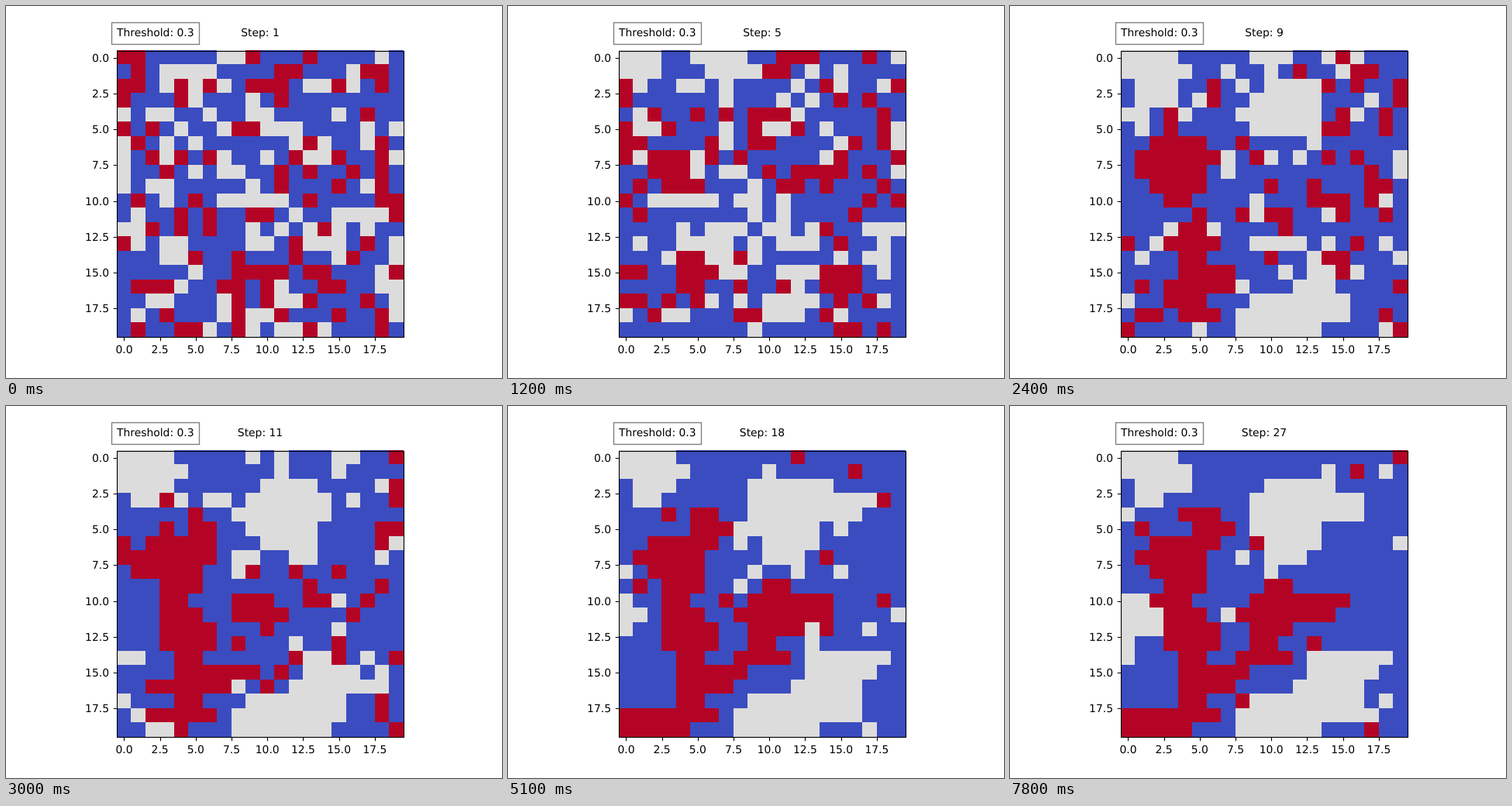
Write an HTML page that moves like this. It is 640 px wide and 480 px high and loops after 8000 ms.

```html
<!DOCTYPE html>
<html lang="en">
<head>
<meta charset="utf-8">
<title>Segregation model</title>
<style>
  html, body { margin: 0; width: 100%; height: 100%; overflow: hidden; background: #fff; }
  svg { display: block; width: 640px; height: 480px; }
  text { font: 13.889px "DejaVu Sans", sans-serif; text-rendering: geometricPrecision; }
  .line { fill: none; stroke: #000; stroke-width: 1.11; }
</style>
</head>
<body>
<svg id="stage" viewBox="0 0 640 480">
  <rect width="640" height="480" fill="#fff"/>
  <g id="cells" shape-rendering="crispEdges"></g>
  <g id="axes"></g>
  <rect class="line" x="143.5" y="58.5" width="370" height="369"/>
  <rect x="136.5" y="21.5" width="113" height="28" fill="#fff" stroke="#7f7f7f" stroke-width="1.39"/>
  <text x="143" y="39">Threshold: 0.3</text>
  <text id="label" x="328" y="39" text-anchor="middle">Step: 1</text>
</svg>
<script>
const N = 20, STEPS = 27, STEP_MS = 300, LOOP_MS = 8000;
const RED = 1, WHITE = 2;
const COLORS = ["#3b4cc0", "#b40426", "#dddcdc"];
const TOTAL = { [RED]: 94, [WHITE]: 106 };
const THRESHOLD = 0.3, STAY = 0.6, PACE = 2.2;

// Each cluster spreads from its seeds [x, y, step] until it fills its outline.
const clusters = [
  { kind: RED, seeds: [[3.5, 8, 2], [5, 15.5, 2]],
    outline: "M5 4H7L8 5.3 6 7V10L5 10.5 7 12V14H6V15H9L7.4 17H6V18H7.2L4.8 20H0V18H4V14H3V9.5L1 7.3 2.2 6H5Z" },
  { kind: RED, seeds: [[10.5, 11.5, 8]],
    outline: "M10 9H12V10H16L15 12H12.2L11 13.2 12 15H7.8L9 14V12H8.2V11Z" },
  { kind: WHITE, seeds: [[1, 0.5, 0]], outline: "M0 0H3L4.8 1V2L2.8 4H1V2H0Z" },
  { kind: WHITE, seeds: [[11.5, 4, 4]], outline: "M10.5 2H13.5L17 3V5H14L13.2 8H10.3L9 5V3Z" },
  { kind: WHITE, seeds: [[11.5, 17.5, 1]], outline: "M13 14H20L17 16V19L11 20H8V18L13 16Z" },
  { kind: WHITE, seeds: [[0.5, 11.5, 15]], outline: "M0 10H2L3 12 1 13V15H0Z" }
];

let state = 20;
function random() {
  state = (Math.imul(state, 1664525) + 1013904223) >>> 0;
  return state / 4294967296;
}

const column = i => i % N;
const row = i => Math.floor(i / N);

// For every cell: the group that settles there and the step it does so.
const pen = document.createElement("canvas").getContext("2d");
const homes = Array.from({ length: N * N }, () => ({ kind: 0, step: Infinity }));
for (const { kind, seeds, outline } of clusters) {
  const path = new Path2D(outline);
  homes.forEach((home, i) => {
    const x = column(i) + 0.5, y = row(i) + 0.5;
    if (!pen.isPointInPath(path, x, y)) return;
    home.kind = kind;
    home.step = Math.min(...seeds.map(([sx, sy, from]) => from + PACE * Math.hypot(x - sx, y - sy)));
  });
}

function content(grid, i) {
  let same = 0, all = 0;
  grid.forEach((kind, k) => {
    const near = Math.abs(column(k) - column(i)) < 2 && Math.abs(row(k) - row(i)) < 2;
    if (!kind || k === i || !near) return;
    all++;
    if (kind === grid[i]) same++;
  });
  return all > 0 && same / all >= THRESHOLD;
}

// Settled cells stay; some content agents wait, all others move at random.
function nextGrid(step, prev) {
  const grid = new Uint8Array(N * N), left = { ...TOTAL };
  const place = (i, kind) => {
    if (!kind || grid[i] || !left[kind]) return;
    grid[i] = kind;
    left[kind]--;
  };
  homes.forEach((home, i) => { if (home.step <= step) place(i, home.kind); });
  if (prev) prev.forEach((kind, i) => {
    if (kind && random() < STAY && content(prev, i)) place(i, kind);
  });
  for (const kind of [RED, WHITE])
    while (left[kind]) place(Math.floor(random() * N * N), kind);
  return grid;
}

const grids = [];
for (let step = 1; step <= STEPS; step++) grids.push(nextGrid(step, grids[step - 2]));

function add(parent, tag, attrs, text = "") {
  const el = document.createElementNS("http://www.w3.org/2000/svg", tag);
  for (const key in attrs) el.setAttribute(key, attrs[key]);
  el.textContent = text;
  return parent.appendChild(el);
}

const axes = document.getElementById("axes");
for (let value = 0; value < N; value += 2.5) {
  const offset = (value + 0.5) * 18.48, x = 143.2 + offset, y = 57.6 + offset;
  const tx = Math.round(x) + 0.5, ty = Math.round(y) + 0.5, name = value.toFixed(1);
  add(axes, "path", { class: "line", d: `M${tx} 427.5v4.86M143.5 ${ty}h-4.86` });
  add(axes, "text", { x, y: 448, "text-anchor": "middle" }, name);
  add(axes, "text", { x: 133, y: Math.round(y + 5), "text-anchor": "end" }, name);
}

const board = document.getElementById("cells"), label = document.getElementById("label");
const edge = (start, k) => Math.floor(start + k * 18.5);
const cells = homes.map((_, i) => {
  const x = edge(143, column(i)), y = edge(57, row(i));
  const width = edge(143, column(i) + 1) - x, height = edge(57, row(i) + 1) - y;
  return add(board, "rect", { x, y, width, height });
});

const start = performance.now();
let shown = -1;
function draw() {
  const time = (performance.now() - start) % LOOP_MS;
  const index = Math.min(STEPS - 1, Math.floor(time / STEP_MS));
  if (index !== shown) {
    shown = index;
    label.textContent = `Step: ${index + 1}`;
    cells.forEach((cell, i) => cell.setAttribute("fill", COLORS[grids[index][i]]));
  }
  requestAnimationFrame(draw);
}
draw();
</script>
</body>
</html>
```
